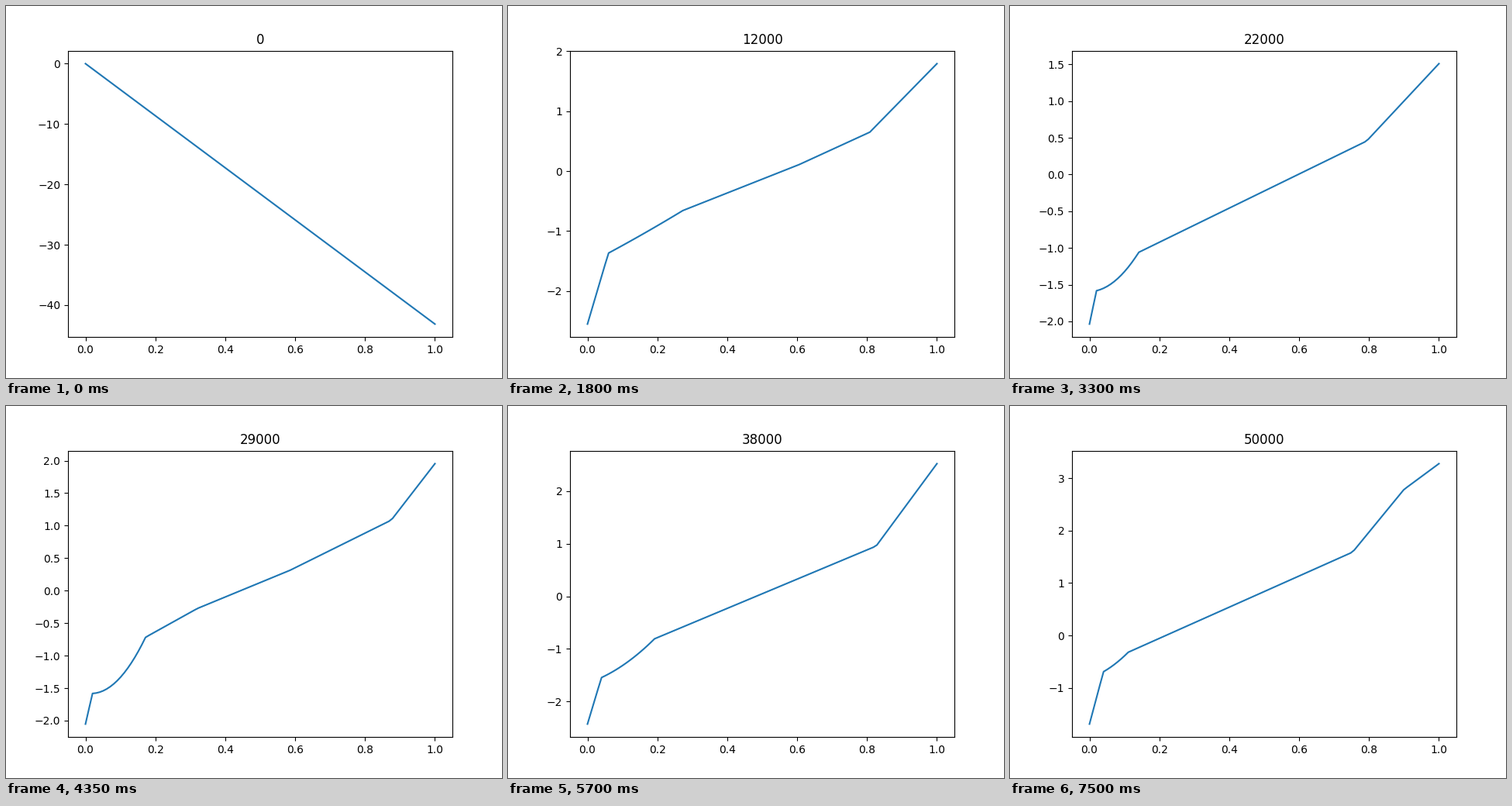
A matplotlib script for the animation above (7650 ms loop, 640 by 480 pixels).

```python
import numpy as np
import matplotlib.pyplot as plt
from matplotlib.animation import FuncAnimation

FRAMES = 51
INTERVAL = 150
STEP = 1000
FIRST_DECAY = 20  # the steep starting slope vanishes almost at once

x = np.linspace(0, 1, 100)


def curve(*points, sag=0):
    """Polyline through the points whose second segment sags as a parabola."""
    px, py = zip(*points)
    u = np.clip((x - px[1]) / (px[2] - px[1]), 0, 1)
    return np.interp(x, px, py) - sag * (py[2] - py[1]) * u * (1 - u)


# Main bends of the curve at the frames where its shape is known.
keys = {
    0: -43.14 * x,
    7: curve((0, -1.21), (.033, -1.19), (.091, -.507), (.475, 1.35),
             (.525, 1.796), (.557, 1.785), (1, -1.938)),
    12: curve((0, -2.55), (.06, -1.367), (.273, -.657), (.606, .11),
              (.808, .65), (1, 1.792), sag=.06),
    22: curve((0, -2.037), (.02, -1.583), (.141, -1.06), (.793, .455),
              (1, 1.509), sag=.74),
    29: curve((0, -2.053), (.02, -1.582), (.172, -.717), (.32, -.275),
              (.586, .315), (.875, 1.085), (1, 1.954), sag=.96),
    38: curve((0, -2.43), (.04, -1.546), (.192, -.808), (.826, .955),
              (1, 2.523), sag=.36),
    49: curve((0, -1.69), (.04, -.692), (.111, -.32), (.753, 1.59),
              (.9, 2.785), (1, 3.277), sag=.27),
}
times = list(keys)


def curve_at(frame):
    frame = min(frame, times[-1])
    end = next(t for t in times[1:] if t >= frame)
    start = times[times.index(end) - 1]
    t = (frame - start) / (end - start)
    if start == 0:
        t = 1 - (1 - t) ** FIRST_DECAY
    return (1 - t) * keys[start] + t * keys[end]


fig, ax = plt.subplots(figsize=(6.4, 4.8), dpi=100)


def draw(frame):
    ax.clear()
    ax.plot(x, curve_at(frame))
    ax.set_title(str(frame * STEP))


anim = FuncAnimation(fig, draw, frames=FRAMES, interval=INTERVAL,
                     init_func=lambda: None, repeat=True, repeat_delay=0)
plt.show()
```
